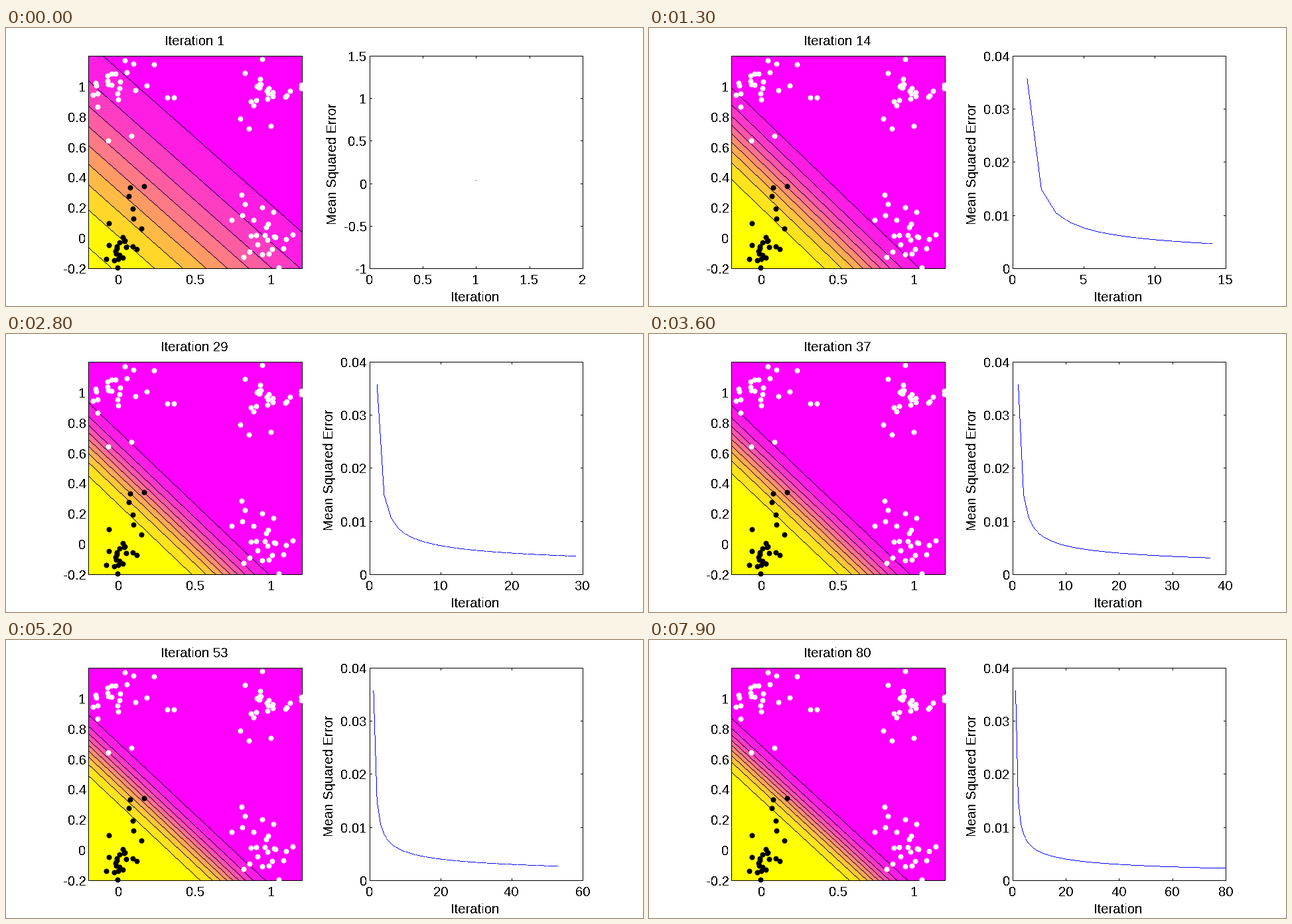
Write a matplotlib script that moves like this. It is 960 px wide and 420 px high and loops after 8000 ms.

```python
import math

import matplotlib.pyplot as plt
import numpy as np
from matplotlib.animation import FuncAnimation
from matplotlib.patches import Polygon, Rectangle

WIDTH, HEIGHT, DPI = 960, 420, 100
PX = 72 / DPI
FRAMES, INTERVAL = 80, 100
TOP, BOTTOM = 42, 363
MAP_LEFT, MAP_RIGHT = 124, 446
PLOT_LEFT, PLOT_RIGHT = 548, 869
FONT = dict(family="Liberation Sans", fontsize=20.3 * PX, color="black")
plt.rcParams["text.antialiased"] = False

fig = plt.figure(figsize=(WIDTH / DPI, HEIGHT / DPI), dpi=DPI, facecolor="white")
ax = fig.add_axes([0, 0, 1, 1])
rng = np.random.default_rng(4)


def cluster(center, spread, stragglers, size=25):
    """Normal samples around a corner, plus its few far points."""
    core = rng.normal(center, spread, (size - len(stragglers), 2))
    core = np.clip(core, (MAP_LEFT + 3, TOP + 4), (MAP_RIGHT - 1, BOTTOM - 2))
    return np.vstack([core, stragglers])


ONES = np.vstack([
    cluster((165, 82), (18, 16), [(223, 54), (212, 86), (243, 104), (253, 104),
                                  (189, 162), (154, 169)]),
    cluster((402, 92), (25, 13), [(386, 46), (353, 136), (366, 151), (399, 147)]),
    cluster((392, 315), (24, 22), [(355, 251), (360, 265), (386, 270), (340, 289)]),
])
ZEROS = cluster((167, 331), (14, 14), [(187, 240), (208, 238), (185, 253),
                                       (191, 272), (192, 287), (204, 302)])

EPOCHS = np.arange(1, FRAMES + 1)
# A fast first drop over a slow power-law tail.
ERRORS = 0.0133 * EPOCHS ** -0.4 + 0.0225 * EPOCHS ** -2.2


def line(xs, ys, color="black", low=-1, high=HEIGHT):
    """One-pixel polyline without smoothing, kept between two rows."""
    for x0, x1, y0, y1 in zip(xs[:-1], xs[1:], ys[:-1], ys[1:]):
        steps = int(max(abs(x1 - x0), abs(y1 - y0))) + 1
        px = np.round(np.linspace(x0, x1, steps))
        py = np.round(np.linspace(y0, y1, steps))
        inside = (py >= low) & (py <= high)
        ax.plot(px[inside], py[inside], ",", color=color)


def text(x, y, label, ha="center", **kw):
    ax.text(x, y, label, ha=ha, va="baseline", **FONT, **kw)


def box(left, right):
    line([left, right, right, left, left], [TOP, TOP, BOTTOM, BOTTOM, TOP])


def dots(points, color):
    ax.plot(*points.T, "o", color=color, ms=8 * PX, mew=0)


def scale(value, lo, hi, start, end):
    return start + (value - lo) / (hi - lo) * (end - start)


def spring(t):
    """Yellow to magenta in 64 steps."""
    step = min(int(t * 64), 63) / 63
    return (1, 1 - step, step)


def nice_ticks(lo, hi, most):
    """Finest 1-2-5 ticks that enclose the range with at most `most` marks."""
    if lo == hi:
        lo, hi = lo - 1, hi + 1
    for power in range(-4, 3):
        for base in (1, 2, 5):
            step = base * 10.0 ** power
            first = math.floor(lo / step + 1e-9)
            last = math.ceil(hi / step - 1e-9)
            if last - first < most:
                return [round(k * step, 6) for k in range(first, last + 1)]


def label_width(label):
    return sum({".": 0.278, "-": 0.333}.get(c, 0.556) for c in label) * 20


def draw_map(n):
    center = 158.5 + 18.5 * n ** -1.2
    foot = 333.5 + 0.155 * n
    per_logit = 70.3 * n ** -0.305
    drop = (BOTTOM - center) / (foot - MAP_LEFT) * (MAP_RIGHT - MAP_LEFT)
    lowest = 1 / (1 + math.exp((BOTTOM - center) / per_logit))

    area = Rectangle((MAP_LEFT, TOP), MAP_RIGHT - MAP_LEFT, BOTTOM - TOP,
                     fc=spring(0), lw=0)
    ax.add_patch(area)
    levels = np.arange(1, 10) / 10
    edges = center - per_logit * np.log(levels / (1 - levels))
    for level, y in zip(levels, edges):
        band = Polygon([(MAP_LEFT, y), (MAP_RIGHT, y + drop),
                        (MAP_RIGHT, -500), (MAP_LEFT, -500)], lw=0,
                       fc=spring((level - lowest) / (0.9 - lowest)),
                       antialiased=False)
        ax.add_patch(band)
        band.set_clip_path(area)
    for y in edges:
        line([MAP_LEFT, MAP_RIGHT], [y, y + drop], low=TOP, high=BOTTOM)
    box(MAP_LEFT, MAP_RIGHT)

    for value in (0, 0.5, 1):
        text(scale(value, -0.2, 1.2, MAP_LEFT, MAP_RIGHT), 386, f"{value:g}")
    for k in range(-1, 6):
        y = scale(k / 5, -0.2, 1.2, BOTTOM, TOP)
        text(121, y + 7, f"{k / 5:g}", ha="right")
    text(284, 25, f"Iteration {n}")
    dots(ONES, "white")
    dots(ZEROS, "black")


def draw_error(n):
    xs, ys = EPOCHS[:n], ERRORS[:n]
    xticks = nice_ticks(1, n, 5)
    yticks = nice_ticks(ys.min(), ys.max(), 7)

    def to_x(v):
        return scale(v, xticks[0], xticks[-1], PLOT_LEFT, PLOT_RIGHT)

    def to_y(v):
        return scale(v, yticks[0], yticks[-1], BOTTOM, TOP)

    box(PLOT_LEFT, PLOT_RIGHT)
    for value in xticks:
        x = to_x(value)
        line([x, x], [BOTTOM, BOTTOM - 3])
        line([x, x], [TOP, TOP + 3])
        text(x, 386, f"{value:g}")
    for value in yticks:
        y = to_y(value)
        line([PLOT_LEFT, PLOT_LEFT + 3], [y, y])
        line([PLOT_RIGHT, PLOT_RIGHT - 3], [y, y])
        text(544, y + 7, f"{value:g}", ha="right")
    curve_x, curve_y = to_x(xs), to_y(ys)
    line([curve_x[0], *curve_x], [curve_y[0], *curve_y], "blue")

    widest = max(label_width(f"{v:g}") for v in yticks)
    text(707, 412, "Iteration")
    text(532 - widest, 204, "Mean Squared Error", rotation=90,
         rotation_mode="anchor")


def draw(i):
    ax.clear()
    ax.set_axis_off()
    # Whole numbers address pixel columns and rows.
    ax.set_xlim(0, WIDTH)
    ax.set_ylim(HEIGHT - 1, -1)
    draw_map(i + 1)
    draw_error(i + 1)
    return []


animation = FuncAnimation(fig, draw, frames=FRAMES, interval=INTERVAL,
                          repeat=True, repeat_delay=0)
plt.show()
```
